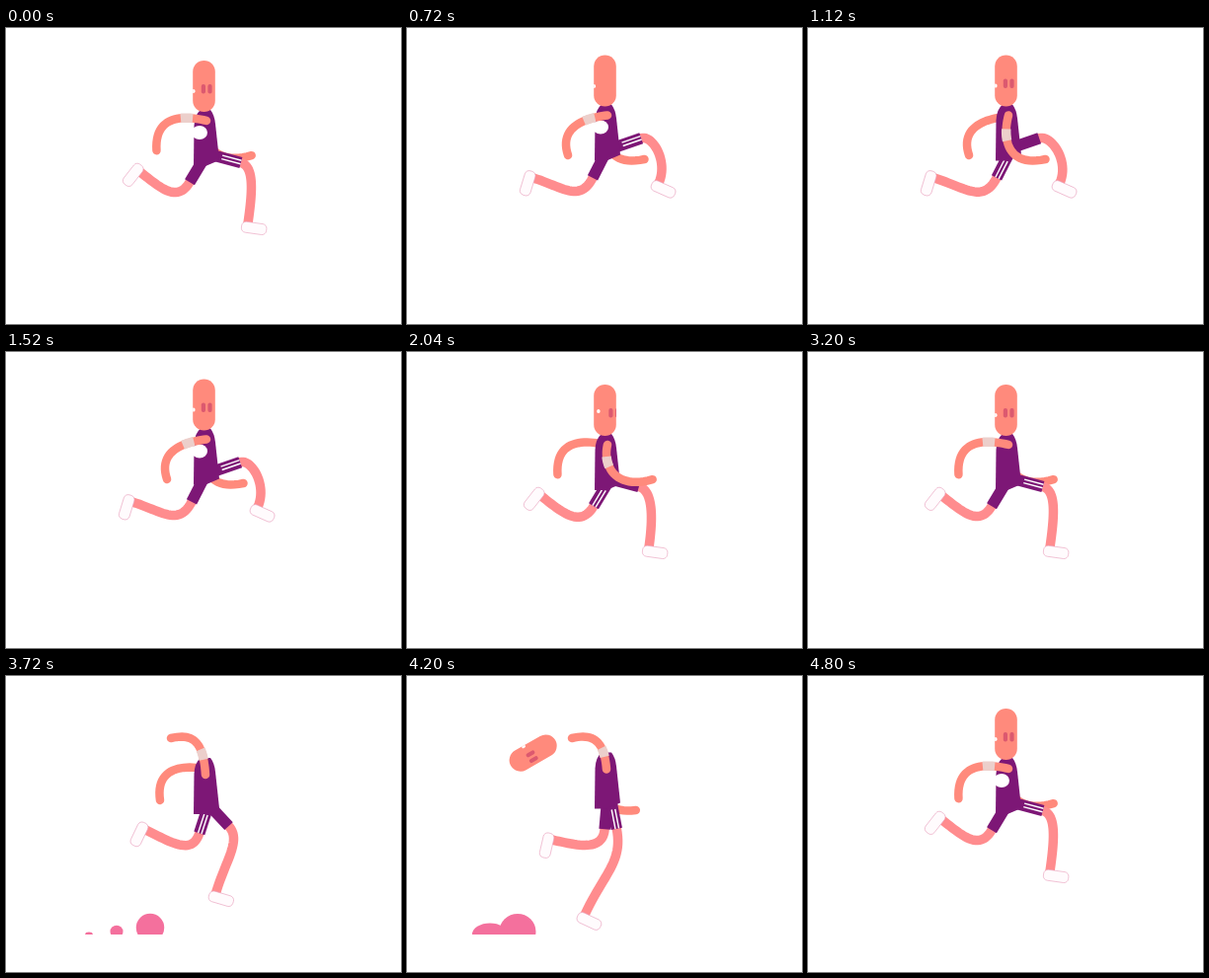
Animation, 400 px wide and 300 px high, one loop 4.84 s. Source, as an HTML page with a canvas:

```html
<!DOCTYPE html>
<html lang="en">
<head>
<meta charset="utf-8">
<title>Runner</title>
<style>
html, body { margin: 0; width: 100%; height: 100%; overflow: hidden; background: #fff; }
canvas { display: block; }
</style>
</head>
<body>
<canvas id="stage" width="400" height="300"></canvas>
<script>
const ctx = document.getElementById('stage').getContext('2d');
const LOOP = 4840, POSE = 80, STRIDE = 10;
const SKIN = '#ff8a7c', LEG = '#ff8c8e', KIT = '#7d1776', DUST = '#f4709d', WHITE = '#fff';

// Key poses of one stride: step, thigh angle, ankle x, ankle y, shoe angle
const legKeys = [
  [0, 75, 245, 198, 8],
  [2, 11, 180, 242, 25],
  [4, -27, 128, 152, 107],
  [5, -31, 136, 146, 128],
  [7, -5, 147, 166, 103],
  [9, 109, 255, 157, 24],
  [10, 75, 245, 198, 8]
];
// Arm extremes and middle: two curve handles and the hand
const armBack = [179, 88, 150, 88, 152, 124];
const armMid = [190, 102, 172, 132, 204, 139];
const armFront = [198, 115, 211, 140, 249, 129];
const armRaised = [200, 70, 192, 57, 167, 63];

const rad = degrees => degrees * Math.PI / 180;
const mix = (a, b, u) => a + (b - a) * u;
const ease = x => { x = Math.max(0, Math.min(1, x)); return x * x * (3 - 2 * x); };

function trace(p) {
  ctx.beginPath();
  for (let i = 0; i < p.length; i += 2) ctx.lineTo(p[i], p[i + 1]);
}

function stroke(color, width, cap = 'butt') {
  ctx.strokeStyle = color;
  ctx.lineWidth = width;
  ctx.lineCap = cap;
  ctx.stroke();
}

function fillRound(x, y, w, h, r, color) {
  ctx.beginPath();
  ctx.roundRect(x, y, w, h, r);
  ctx.fillStyle = color;
  ctx.fill();
}

function fillEllipse(x, y, rx, ry, color) {
  ctx.beginPath();
  ctx.ellipse(x, y, rx, ry, 0, 0, 7);
  ctx.fillStyle = color;
  ctx.fill();
}

// Part of a cubic curve as a polyline
function curve(p, from = 0, to = 1) {
  const out = [];
  for (let i = 0; i <= 24; i++) {
    const u = mix(from, to, i / 24), v = 1 - u;
    for (const k of [0, 1])
      out.push(v * v * v * p[k] + 3 * v * v * u * p[k + 2] + 3 * v * u * u * p[k + 4] + u * u * u * p[k + 6]);
  }
  return out;
}

function legPose(step) {
  const i = legKeys.findIndex(key => key[0] > step), a = legKeys[i - 1], b = legKeys[i];
  return a.map((value, k) => mix(value, b[k], (step - a[0]) / (b[0] - a[0])));
}

function leg(step, hipX, hipY, striped) {
  const [, thigh, ax, ay, shoe] = legPose(step);
  const dx = Math.sin(rad(thigh)), dy = Math.cos(rad(thigh));
  const along = (d, side = 0) => [hipX + dx * d - dy * side, hipY + dy * d + dx * side];
  const hem = 33, [kx, ky] = along(hem);

  // The calf leaves along the thigh and meets the shoe at a right angle
  const span = Math.hypot(ax - kx, ay - ky), bend = span * (0.4 - 0.17 * dx);
  const shin = [ax + span * 0.5 * Math.sin(rad(shoe)), ay - span * 0.5 * Math.cos(rad(shoe))];
  trace(curve([kx, ky, ...along(hem + bend), ...shin, ax, ay]));
  stroke(LEG, 9.5, 'round');

  ctx.save();
  ctx.translate(ax, ay);
  ctx.rotate(rad(shoe));
  fillRound(-6, -1.5, 25.5, 11, 4.5, '#fffbfd');
  stroke('#e9a0bd', 0.6);
  ctx.restore();

  trace([hipX, hipY, kx, ky]);
  stroke(KIT, 11.5);
  if (!striped) return;
  for (const side of [-2.3, 1.3]) {
    trace([...along(13, side), ...along(hem, side)]);
    stroke(WHITE, 1.4);
  }
}

// 1 is fully back, -1 fully forward, lingering at both ends
function armSwing(step) {
  const c = Math.cos(rad(step * 36 - 9));
  return Math.sign(c) * Math.abs(c) ** 0.65;
}

function armShape(s) {
  return armMid.map((m, i) =>
    m + s * (armBack[i] - armFront[i]) / 2 + s * s * ((armBack[i] + armFront[i]) / 2 - m));
}

function arm(shape, x, y, band) {
  const path = [x, y, ...shape];
  trace(curve(path));
  stroke(SKIN, 8.5, 'round');
  if (!band) return;
  trace(curve(path, 0.19, 0.36));
  stroke('#eccfcb', 9.5);
}

function torso(y) {
  ctx.beginPath();
  ctx.moveTo(197, y + 50);
  ctx.lineTo(207, y + 50);
  ctx.quadraticCurveTo(211, y + 55, 212, y + 64);
  ctx.lineTo(216, y + 101);
  ctx.lineTo(202, y + 107);
  ctx.lineTo(190, y + 107);
  ctx.lineTo(190.5, y + 66);
  ctx.quadraticCurveTo(191, y + 55, 197, y + 50);
  ctx.fillStyle = KIT;
  ctx.fill();
}

function head(x, y, angle, turn) {
  ctx.save();
  ctx.translate(x, y);
  ctx.rotate(rad(angle));
  fillRound(-11.3, -26, 22.6, 52, 11.3, SKIN);
  ctx.clip();
  for (const eye of [-2.7, 3.9])
    fillRound(eye + turn, -2, 4.2, 9.5, 2, '#dc596f');
  const slide = 4 * Math.sin(Math.PI * turn / 14);
  fillRound(slide - 12.2, 3 - slide, 3.2, 4, 1.6, WHITE);
  ctx.restore();
}

// A puff swells, then a white hole eats it away
function puff(x, y, rx, ry, age, life) {
  const grow = ease(age / 50), hole = ease((age - life) / 40);
  if (age <= 0 || hole >= 1) return;
  fillEllipse(x, y, rx * grow, ry * grow, DUST);
  if (hole > 0) fillEllipse(x, y + 2, rx * hole, ry * hole, WHITE);
}

function dust(t) {
  ctx.save();
  ctx.beginPath();
  ctx.rect(0, 200, 400, 62);
  ctx.clip();
  puff(146, 255, 22, 22, t - 90, 70);
  puff(112, 259, 18.5, 18, t - 100, 105);
  puff(84, 262, 18, 11.5, t - 105, 130);
  ctx.restore();
}

// The face looks away and back once every two strides
function faceTurn(t) {
  const p = t % 1600;
  return 14.5 * (ease((p - 300) / 300) - ease((p - 800) / 300));
}

// The head flies off to the left and is later thrown back
function placeHead(t, restY) {
  const x = 200.5, away = (t - 3220) / 180, back = (t - 3960) / 560;
  if (away <= 0 || back >= 1) return head(x, restY, 0, faceTurn(t));
  if (away < 1) return head(x - 250 * away, restY + 60 * away * away, -200 * away, 0);
  if (back > 0) {
    const left = 1 - back;
    head(x - 223 * left * left, restY + 43 * left, 105 * left, 0);
  }
}

function draw(now) {
  const t = Math.floor(now % LOOP / 40) * 40;
  const step = Math.floor(t / POSE), near = step % STRIDE, far = (near + 5) % STRIDE;
  const y = 29 + 4.9 * Math.cos(rad(step * 72 - 36));
  const swing = armSwing(near), reaching = t >= 3360 && t < 4520;

  ctx.fillStyle = WHITE;
  ctx.fillRect(0, 0, 400, 300);
  dust(t % 400);
  arm(armShape(armSwing(far)), 205, y + 62, false);
  leg(far, 203, y + 95, false);
  leg(near, 206, y + 95, true);
  torso(y);
  // White opening under the swung-back arm
  if (swing > 0.4 && (t < 3000 || t >= 4520)) fillEllipse(196, y + 73, 8, 7, WHITE);
  if (reaching) arm(armRaised, 202, y + 67, true);
  else arm(armShape(swing), 203, y + 61, true);
  placeHead(t, y + 26);
}

const start = performance.now();
function frame() {
  draw(performance.now() - start);
  requestAnimationFrame(frame);
}
frame();
</script>
</body>
</html>
```
